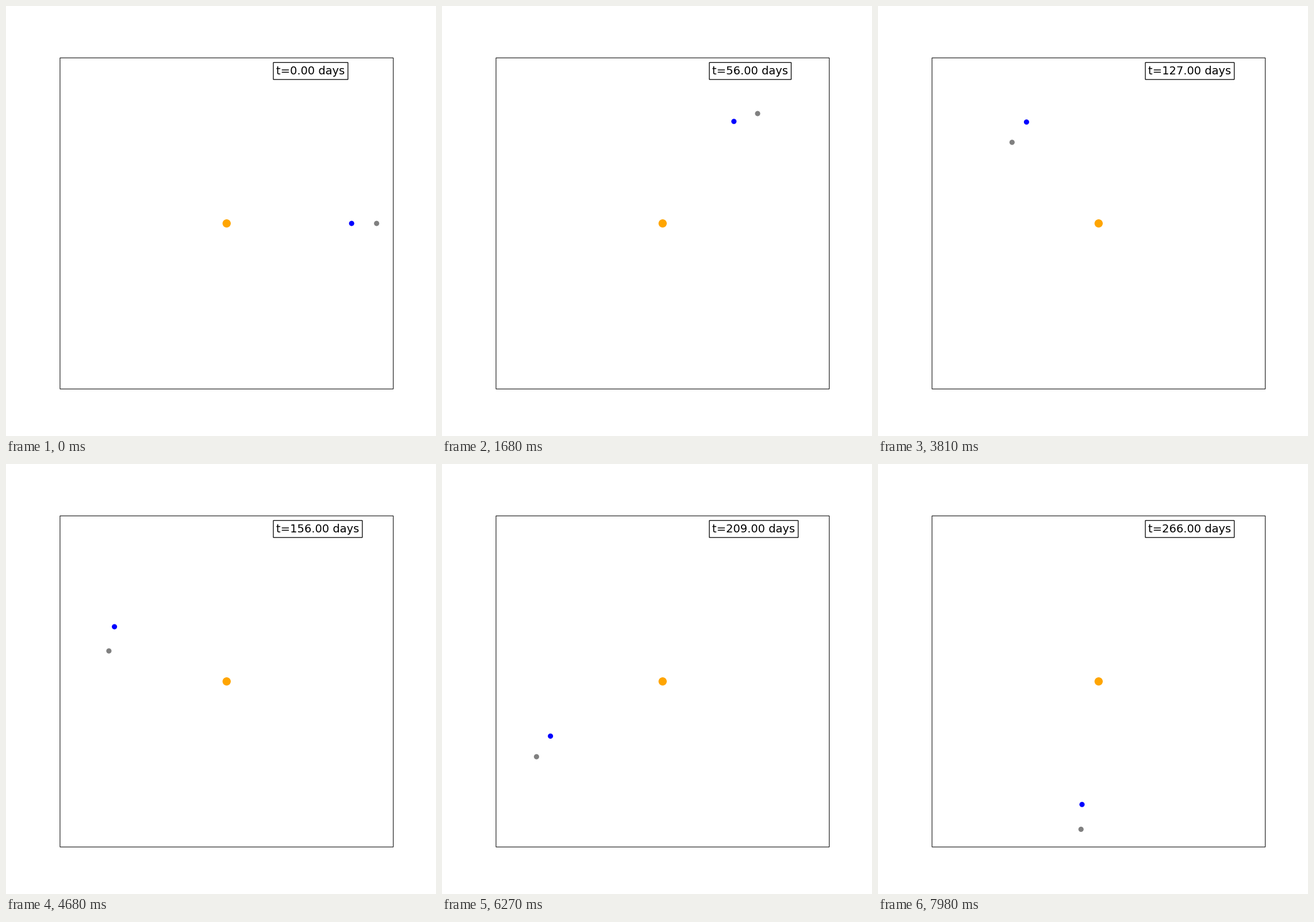
A matplotlib script that plays this animation: 748 px wide and 748 px high, repeating every 8000 ms.

```python
import numpy as np
import matplotlib.pyplot as plt
from matplotlib.animation import FuncAnimation
from matplotlib.patches import Circle, Rectangle

# Layout uses an 800-unit grid, scaled smoothly to the stage.
SIZE, GRID = 748, 800
LOOP_MS, STEP_MS, DAY_MS = 8000, 10, 30

LEFT, TOP, WIDTH, HEIGHT = 100, 96, 620, 616
CENTRE = np.array([LEFT + WIDTH / 2, TOP + HEIGHT / 2])
UNIT = np.array([WIDTH, -HEIGHT]) / 4

PLANET_R, PLANET_DAYS = 1.5, 365
MOON_R, MOON_DAYS = 0.3, 27.3


def orbit(radius, period, day):
    angle = 2 * np.pi * day / period
    return radius * UNIT * np.array([np.cos(angle), np.sin(angle)])


fig = plt.figure(figsize=(8, 8), dpi=SIZE / 8, facecolor="white")
ax = fig.add_axes([0, 0, 1, 1])
ax.set_axis_off()
# Whole numbers fall on pixel centres.
ax.set(xlim=(-0.5, GRID - 0.5), ylim=(GRID - 0.5, -0.5))


def disc(radius, color):
    return ax.add_patch(Circle(CENTRE, radius, facecolor=color, linewidth=0))


ax.add_patch(Rectangle((LEFT, TOP), WIDTH, HEIGHT, fill=False,
                       edgecolor="black", linewidth=0.8, snap=False))
disc(7.64, "orange")
planet = disc(4.86, "blue")
moon = disc(4.86, "gray")

label = fig.text((LEFT + 0.65 * WIDTH) / GRID,
                 1 - (TOP + 0.05 * HEIGHT) / GRID, "",
                 fontsize=15, family="DejaVu Sans",
                 bbox={"facecolor": "white", "edgecolor": "black",
                       "pad": 4, "snap": False})


def update(i):
    day = i * STEP_MS // DAY_MS
    planet.center = CENTRE + orbit(PLANET_R, PLANET_DAYS, day)
    moon.center = planet.center + orbit(MOON_R, MOON_DAYS, day)
    label.set_text(f"t={day:.2f} days")
    return planet, moon, label


anim = FuncAnimation(fig, update, frames=LOOP_MS // STEP_MS,
                     interval=STEP_MS, repeat=True, repeat_delay=0)
plt.show()
```
